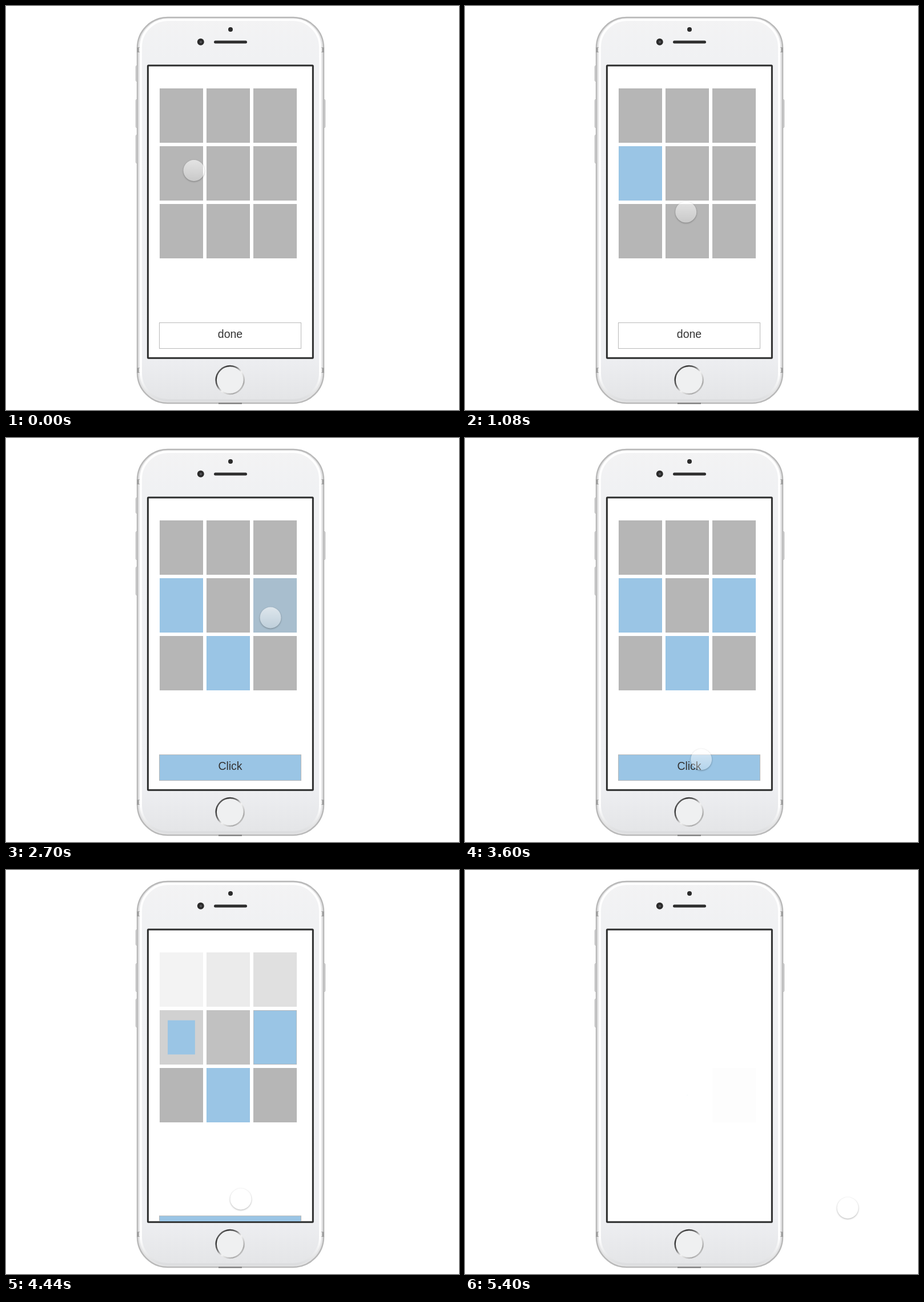
Animation of 793x706 px, one loop 5640 ms. Source, as an HTML page:

```html
<!DOCTYPE html>
<html lang="en">
<head>
<meta charset="utf-8">
<title>Tile picker</title>
<style>
html, body { margin: 0; width: 100%; height: 100%; overflow: hidden; background: #fff; }
svg { position: absolute; left: 0; top: 0; }
text { font: 19.5px "Liberation Sans", Arial, sans-serif; text-anchor: middle; fill: #333; }
#touch {
  position: absolute; left: -18.5px; top: -18.5px; width: 37px; height: 37px; border-radius: 50%;
  background: linear-gradient(rgba(255,255,255,.62), rgba(255,255,255,.26));
  box-shadow: 0 1px 3px rgba(0,0,0,.32);
}
</style>
</head>
<body>
<svg width="793" height="706" viewBox="0 0 793 706">
  <defs>
    <linearGradient id="face" x2="0" y2="1">
      <stop stop-color="#f3f3f4"/><stop offset=".1" stop-color="#f0f1f3"/>
      <stop offset=".88" stop-color="#eeeff2"/><stop offset="1" stop-color="#e4e5e7"/>
    </linearGradient>
    <linearGradient id="shine" x2="0" y2="1">
      <stop stop-color="#fff"/><stop offset=".93" stop-color="#fff"/><stop offset="1" stop-color="#dcdddf"/>
    </linearGradient>
    <linearGradient id="ring" x2="1" y2="1">
      <stop stop-color="#aaa"/><stop offset=".22" stop-color="#333"/><stop offset=".4" stop-color="#777"/>
      <stop offset=".55" stop-color="#f4f4f4"/><stop offset=".8" stop-color="#aaa"/><stop offset="1" stop-color="#eee"/>
    </linearGradient>
    <clipPath id="view"><rect x="249" y="105" width="287" height="509"/></clipPath>
  </defs>

  <g fill="#e8e8e8" stroke="#aaa">
    <rect x="227.5" y="104.5" width="4" height="27" rx="1"/>
    <rect x="227.5" y="163.5" width="4" height="49" rx="1"/>
    <rect x="227.5" y="225.5" width="4" height="49" rx="1"/>
    <rect x="554.5" y="163.5" width="4" height="49" rx="1"/>
  </g>
  <rect x="230" y="20" width="326" height="674" rx="53" fill="#e4e4e5" stroke="#b9b9b9" stroke-width="2.5"/>
  <rect x="236" y="24" width="314" height="665" rx="48" fill="url(#face)" stroke="url(#shine)" stroke-width="4"/>
  <path d="M229 72.5h5m-5 8h5M552 72.5h5m-5 8h5M229 632.5h5m-5 8h5M552 632.5h5m-5 8h5" stroke="#aaa"/>
  <path d="M231 73v8M555 73v8M231 633v8M555 633v8" stroke="#999" stroke-width="3"/>
  <path d="M372 694.5h41" stroke="#777" stroke-width="2"/>
  <circle cx="393" cy="41" r="4" fill="#2b2b2b"/>
  <circle cx="340.8" cy="62.8" r="6" fill="#2b2b2b"/>
  <circle cx="341" cy="63" r="2" fill="#55565a"/>
  <rect x="364" y="60.5" width="58" height="5" rx="2.5" fill="#2d2d2d"/>
  <circle cx="392.2" cy="653.6" r="24.5" fill="#eff0f1" stroke="url(#ring)" stroke-width="2.5"/>

  <rect x="248.4" y="103.9" width="288.9" height="511.4" rx="1" fill="#fff" stroke="#2b2c2c" stroke-width="3"/>
  <g clip-path="url(#view)">
    <g id="tiles"></g>
    <g id="button">
      <rect x="268.5" y="553.5" width="248" height="45" fill="#fff" stroke="#b9b9b9"/>
      <text x="392.5" y="580">done</text>
    </g>
  </g>
</svg>
<div id="touch"></div>
<script>
const LOOP = 5640, STEP = 60, FADE = 900, MOVE = 450;
const GREY = [182, 182, 182], BLUE = [154, 197, 229], WHITE = [255, 255, 255];
const W = 76, H = 95, LEAVE = 3960, STAGGER = 90;
const picked = { 3: 90, 7: 1330, 5: 2430 };   // tile index: tap time
const stops = [[750, 389, 363], [1740, 462.5, 313.5], [3276, 410.5, 574.5], [4900, 669.5, 590]];

const $ = id => document.getElementById(id);
const mix = (a, b, k) => a + (b - a) * k;
const blend = (a, b, k) => `rgb(${a.map((v, i) => Math.round(mix(v, b[i], k)))})`;

// cubic-bezier(.25, .1, .25, 1)
function ease(t) {
  if (t <= 0) return 0;
  if (t >= 1) return 1;
  const curve = (a, b, u) => 3 * a * u * (1 - u) ** 2 + 3 * b * u * u * (1 - u) + u ** 3;
  let lo = 0, hi = 1;
  for (let i = 0; i < 24; i++) {
    const mid = (lo + hi) / 2;
    if (curve(.25, .25, mid) < t) lo = mid; else hi = mid;
  }
  return curve(.1, 1, lo);
}
const progress = (t, start, length = FADE) => ease((t - start) / length);

function addRect(x, y) {
  const r = document.createElementNS("http://www.w3.org/2000/svg", "rect");
  const set = { x: -W / 2, y: -H / 2, width: W, height: H };
  for (const k in set) r.setAttribute(k, set[k]);
  $("tiles").append(r);
  return { r, at: `translate(${x + W / 2} ${y + H / 2})` };
}
const tiles = Array.from({ length: 9 }, (_, i) => {
  const x = 269 + i % 3 * 82, y = 144 + Math.floor(i / 3) * 101;
  const base = addRect(x, y);
  base.r.setAttribute("transform", base.at);
  return { base: base.r, mark: i in picked ? addRect(x, y) : null };
});
const [panel, label] = $("button").children;

function draw(t) {
  tiles.forEach(({ base, mark }, i) => {
    const gone = progress(t, LEAVE + i * STAGGER);
    base.setAttribute("fill", blend(GREY, WHITE, gone));
    if (mark) {
      mark.r.setAttribute("fill", blend(GREY, BLUE, progress(t, picked[i])));
      mark.r.setAttribute("fill-opacity", t < picked[i] ? 0 : 1);
      mark.r.setAttribute("transform", `${mark.at} scale(${1 - gone})`);
    }
  });

  panel.setAttribute("fill", blend(WHITE, BLUE, progress(t, 2310, 300)));
  label.textContent = t < 2340 ? "done" : "Click";
  $("button").setAttribute("transform", `translate(0 ${61 * progress(t, LEAVE)})`);

  let x = 328.5, y = 287;
  for (const [start, tx, ty] of stops) {
    const k = progress(t, start, MOVE);
    x = mix(x, tx, k);
    y = mix(y, ty, k);
  }
  $("touch").style.transform = `translate(${x}px, ${y}px)`;
}

const origin = performance.now();
function tick() {
  const t = (performance.now() - origin) % LOOP;
  draw(Math.floor(t / STEP) * STEP);
  requestAnimationFrame(tick);
}
tick();
</script>
</body>
</html>
```
